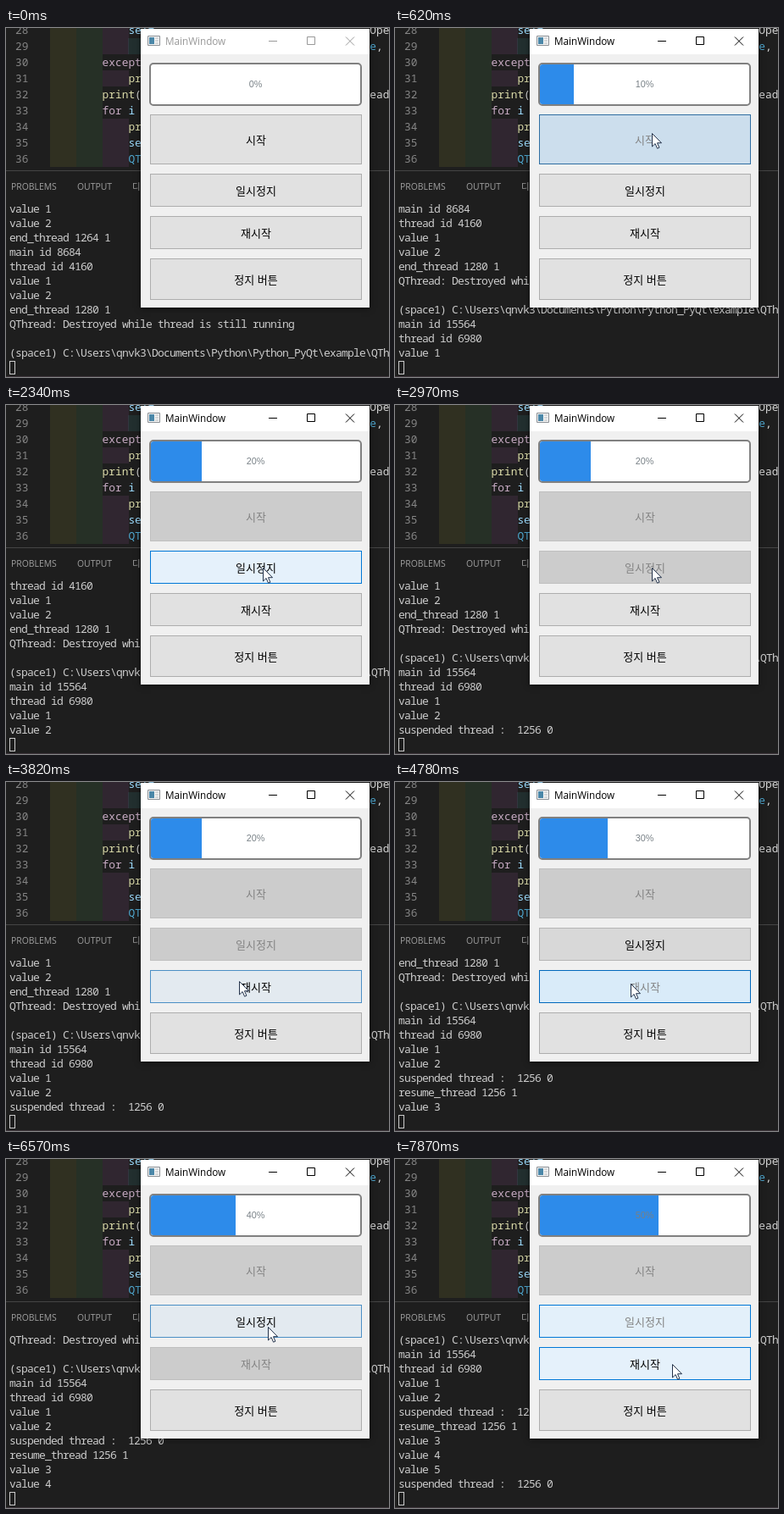
Write an HTML page that moves like this. It is 452 px wide and 412 px high and loops after 8 s.

```html
<!DOCTYPE html>
<html lang="ko">
<head>
<meta charset="utf-8">
<style>
html, body { margin: 0; width: 100%; height: 100%; overflow: hidden; background: #1e1e1e; }
#stage { position: relative; width: 452px; height: 412px; overflow: hidden; background: #1e1e1e; }
#stage div, #stage span, #stage svg, pre { position: absolute; box-sizing: border-box; margin: 0; white-space: pre; }
#editor { left: 0; top: -7px; width: 452px; height: 171px; font: 12.83px/19px "Noto Sans Mono", monospace; }
#editor i { position: absolute; width: 31px; height: 19px; }
#panel { left: 0; top: 168px; width: 452px; height: 1px; background: #454545; }
.tab { top: 179px; font: 10.4px/16px "Open Sans", "Noto Sans CJK KR", sans-serif; color: #a0a0a0; }
#term { left: 4px; top: 205px; width: 448px; height: 187px; overflow: hidden; color: #ccc;
  font: 13px/17px "Noto Sans Mono", monospace; letter-spacing: -.8px; }
#caret { left: 4px; top: 393px; width: 7px; height: 16px; border: 1px solid #ccc; }
#edge { left: 0; top: 411px; width: 452px; height: 1px; background: #3c343a; }
#win { left: 159px; top: 1px; width: 270px; height: 329px; background: #f0f0f0; box-shadow: 0 1px 7px rgba(0,0,0,.5); }
#bar { left: 0; top: 0; width: 270px; height: 30px; background: #fff; }
#title { left: 29px; top: 6px; font: 11.7px/17px "Open Sans", sans-serif; }
#bar svg { left: 0; top: 0; }
#progress { left: 10px; top: 40px; width: 251px; height: 51px; border: 2px solid #808080; border-radius: 5px; background: #fff; overflow: hidden; }
#chunk { left: 0; top: 0; height: 47px; background: #2d8bea; }
#percent { left: 0; width: 247px; top: 0; text-align: center; color: #788086; font: 10.8px/47px "Liberation Sans", sans-serif; }
.btn { left: 11px; width: 250px; border: 1px solid; display: flex; align-items: center; justify-content: center;
  font: 13px/16px "Noto Sans CJK KR", sans-serif; }
#mouse { left: 0; top: 0; overflow: visible; }
</style>
</head>
<body>
<div id="stage">
  <div id="editor"></div>
  <div id="panel"></div>
  <span class="tab" style="left:6px">PROBLEMS</span>
  <span class="tab" style="left:84px">OUTPUT</span>
  <span class="tab" style="left:149px">디버그 콘솔</span>
  <pre id="term"></pre>
  <div id="caret"></div>
  <div id="edge"></div>
  <div id="win">
    <div id="bar">
      <svg width="270" height="30" fill="none">
        <path d="M8.5 8.5h14v11h-14z" fill="#f4f4f4" stroke="#8a8f94"/>
        <path d="M10 10h6v8h-6z" fill="#4b87a8"/>
        <path d="M17 11h4M17 14h4M17 17h4" stroke="#b5b9bc"/>
        <path id="controls" d="M151 14.5h10M196.5 9.5h9v9h-9zM242 9.500l10 10M252 9.500l-10 10"/>
      </svg>
      <span id="title">MainWindow</span>
    </div>
    <div id="progress"><div id="chunk"></div><div id="percent"></div></div>
  </div>
  <svg id="mouse" width="14" height="20">
    <path d="M.5 .5v15.500l3.600-3.500 2.500 5.700 2.300-1-2.400-5.500h5z" fill="#fff" stroke="#23324a"/>
  </svg>
</div>
<script>
const LOOP = 8000, FADE = 250;
const $ = id => document.getElementById(id);
const add = (parent, tag, props, css) => {
  const el = parent.appendChild(document.createElement(tag));
  Object.assign(el, props);
  Object.assign(el.style, css);
  return el;
};

// Editor: indent depth, then [column, text, colour] pieces
const BLUE = '#9cdcfe', YELLOW = '#dcdcaa', PINK = '#c8acc4', CYAN = '#4fa8d0', PLAIN = '#d4d4d4';
const code = [
  [3, [12, 'self', BLUE], [49, 'Ope', PLAIN]],
  [4, [49, 'e', CYAN], [50, ',', PLAIN]],
  [2, [8, 'except', PINK]],
  [3, [12, 'print', YELLOW]],
  [2, [8, 'print', YELLOW], [13, '(', PLAIN], [48, 'read', PLAIN]],
  [2, [8, 'for', PINK], [12, 'i', BLUE]],
  [3, [12, 'print', YELLOW]],
  [3, [12, 'self', BLUE]],
  [3, [12, 'QThread', CYAN]]
];
const bands = ['255,255,64', '127,255,127', '255,127,255', '79,236,236'];
code.forEach(([depth, ...pieces], row) => {
  const top = row * 19 + 'px', text = (textContent, left, color) =>
    add($('editor'), 'span', { textContent }, { left: left + 'px', top, color });
  for (let k = 0; k < depth; k++)
    add($('editor'), 'i', {}, { left: 52 + k * 30.8 + 'px', top, background: `rgba(${bands[k]},.08)` });
  text(28 + row, 11, '#858585');
  pieces.forEach(([col, str, color]) => text(str, 52 + col * 7.7, color));
});

const log = ['value 1', 'value 2', 'end_thread 1264 1', 'main id 8684', 'thread id 4160', 'value 1', 'value 2',
  'end_thread 1280 1', 'QThread: Destroyed while thread is still running', '',
  '(space1) C:\\Users\\qnvk3\\Documents\\Python\\Python_PyQt\\example\\QThread',
  'main id 15564', 'thread id 6980', 'value 1', 'value 2', 'suspended thread :  1256 0',
  'resume_thread 1256 1', 'value 3', 'value 4', 'value 5', 'suspended thread :  1256 0'];

// Timelines of [start ms, value]
const lineCount = [[0, 11], [560, 14], [1640, 15], [2700, 16], [4640, 17], [4710, 18], [5840, 19], [6880, 20], [7150, 21]];
const percent = [[0, 0], [560, 10], [1580, 20], [4700, 30], [5810, 40], [6840, 50]];
const path = [[70, 452, 92], [400, 303, 124], [1650, 303, 124], [2200, 303, 192], [3260, 303, 192], [3430, 308, 157],
  [3780, 275, 234], [3960, 278, 238], [5190, 278, 238], [5670, 295, 241], [6160, 295, 241], [6500, 309, 198],
  [7520, 309, 198], [7860, 327, 242]];

// Button looks: fill, border, text
const looks = {
  on: [[225, 225, 225], [173, 173, 173], '#000'],
  hot: [[229, 241, 251], [0, 120, 215], '#000'],
  down: [[204, 228, 247], [0, 84, 153], '#000'],
  off: [[204, 204, 204], [191, 191, 191], '#838383'],
  hotOff: [[227, 240, 250], [0, 120, 215], '#838383']
};
const buttons = [
  ['시작', 101, 59, [[0, 'on'], [280, 'hot'], [450, 'down'], [560, 'off']]],
  ['일시정지', 171, 39, [[0, 'on'], [1950, 'hot'], [2410, 'down'], [2700, 'off'], [4640, 'on'], [6430, 'hot'], [7110, 'down'], [7200, 'hotOff']]],
  ['재시작', 221, 39, [[0, 'on'], [3680, 'hot'], [4300, 'down'], [4640, 'hotOff'], [6260, 'off'], [7130, 'on'], [7610, 'hot']]],
  ['정지 버튼', 271, 49, [[0, 'on']]]
].map(([textContent, top, height, states]) => ({
  states, el: add($('win'), 'div', { className: 'btn', textContent }, { top: top + 'px', height: height + 'px' })
}));

const indexAt = (keys, t) => keys.findLastIndex(k => k[0] <= t);
const valueAt = (keys, t) => keys[indexAt(keys, t)][1];
const mix = (a, b, p) => `rgb(${a.map((v, i) => Math.round(v + (b[i] - v) * p))})`;

function drawButton({ el, states }, t) {
  const i = indexAt(states, t), now = looks[states[i][1]], before = looks[states[Math.max(0, i - 1)][1]];
  const p = Math.min(1, (t - states[i][0]) / FADE);
  el.style.background = mix(before[0], now[0], p);
  el.style.borderColor = mix(before[1], now[1], p);
  el.style.color = now[2];
}

function drawMouse(t) {
  const i = indexAt(path, t);
  $('mouse').style.visibility = i < 0 ? 'hidden' : 'visible';
  if (i < 0) return;
  const [t0, x0, y0] = path[i], [t1, x1, y1] = path[i + 1] || [LOOP, x0, y0];
  const u = (t - t0) / (t1 - t0), p = u * u * (3 - 2 * u);
  $('mouse').style.transform = `translate(${Math.round(x0 + (x1 - x0) * p)}px,${Math.round(y0 + (y1 - y0) * p)}px)`;
}

function draw(now) {
  const t = now % LOOP, n = valueAt(lineCount, t), done = valueAt(percent, t), active = t >= 450;
  $('term').textContent = log.slice(n - 11, n).join('\n');
  $('percent').textContent = done + '%';
  $('chunk').style.width = Math.ceil(done * 2.46 / 20) * 20 + 'px';
  $('title').style.color = active ? '#000' : '#999';
  $('controls').style.stroke = active ? '#000' : '#999';
  buttons.forEach(b => drawButton(b, t));
  drawMouse(t);
  requestAnimationFrame(() => draw(performance.now() - start));
}
const start = performance.now();
draw(0);
</script>
</body>
</html>
```
